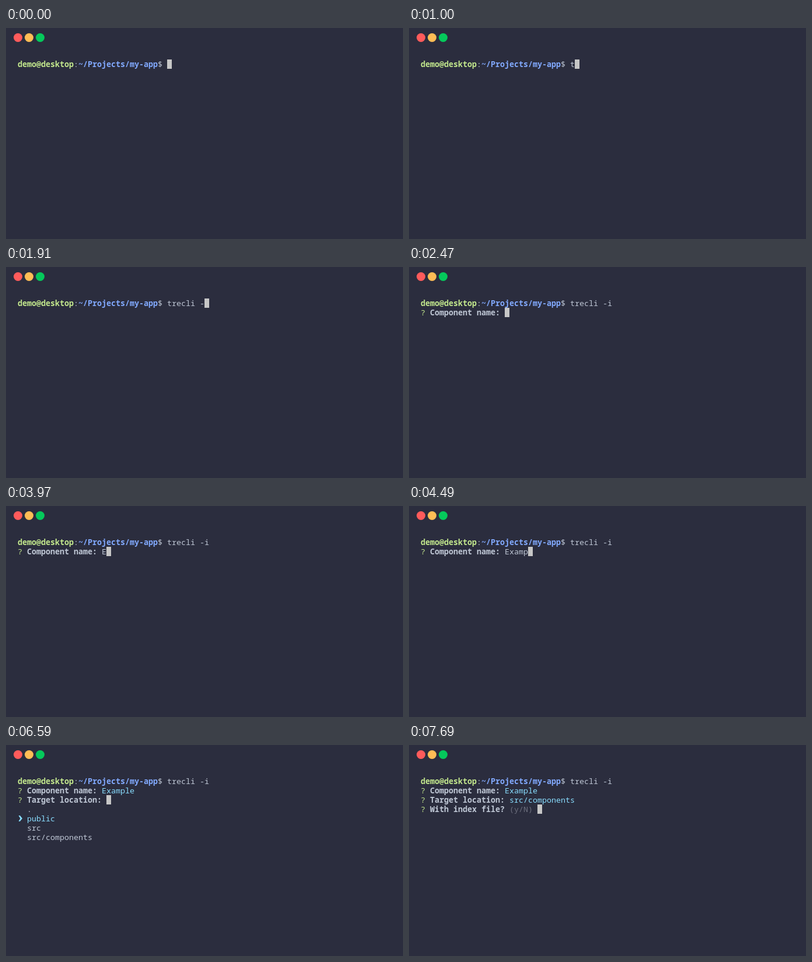
An HTML page with a canvas for the animation above (8000 ms loop, 680x362 px).

```html
<!DOCTYPE html>
<html lang="en">
<head>
<meta charset="utf-8">
<title>Terminal session</title>
<style>
  html, body { margin: 0; width: 100%; height: 100%; overflow: hidden; background: #2b2d3e; }
  canvas { display: block; }
</style>
</head>
<body>
<canvas id="stage" width="680" height="362"></canvas>
<script>
const ctx = document.getElementById('stage').getContext('2d');

const LOOP = 8000, KEY_DELAY = 130;
const CELL = 8, ROW = 16, LEFT = 20, TOP = 54, BASELINE = 13;
const FONT = `${CELL / 0.6}px "Noto Sans Mono", "DejaVu Sans Mono", monospace`;
const COLOR = {
  back: '#2b2d3e', text: '#bfc7d5', green: '#c3e88d', blue: '#82aaff',
  cyan: '#89ddff', dim: '#6c6f7d', cursor: '#c7c7c7'
};
const BUTTONS = ['#ff5b5b', '#ffbd55', '#05c95b'];
const FOLDERS = ['.', 'public', 'src', 'src/components'];
const POINTER = '❯';

const run = (text, color = COLOR.text, bold = false) => ({ text, color, bold });
const question = label => [run('? ', COLOR.green), run(label + ' ', COLOR.text, true)];
const typed = (text, start, t) =>
  text.slice(0, Math.max(0, Math.floor((t - start) / KEY_DELAY) + 1));

const shell = [
  run('demo@desktop', COLOR.green, true), run(':'),
  run('~/Projects/my-app', COLOR.blue, true), run('$ ')
];

// Returns the lines on screen and the line that holds the cursor.
function screenAt(t) {
  const lines = [[...shell, run(typed('trecli -i', 1000, t))]];
  if (t < 2170) return { lines, cursorRow: 0 };
  if (t < 2470) return { lines: [...lines, []], cursorRow: 1 };

  const answered = t >= 4990;
  lines.push([
    ...question('Component name:'),
    run(typed('Example', 3970, t), answered ? COLOR.cyan : COLOR.text)
  ]);
  if (!answered) return { lines, cursorRow: 1 };
  if (t < 5090) return { lines: [...lines, []], cursorRow: 2 };

  const location = question('Target location:');
  lines.push(location);
  if (t >= 7690) {
    location.push(run('src/components', COLOR.cyan));
    lines.push([...question('With index file?'), run('(y/N) ', COLOR.dim)]);
    return { lines, cursorRow: 3 };
  }

  const selected = [6590, 6790, 6990].filter(time => t >= time).length;
  if (selected === 0) location.push(run('(Use arrow keys or type to search)', COLOR.dim));
  FOLDERS.forEach((name, i) => lines.push(i === selected
    ? [run(POINTER, COLOR.cyan), run(' ' + name, COLOR.cyan)]
    : [run('  ' + name)]));
  return { lines, cursorRow: 2 };
}

function drawPointer(x, y) {
  ctx.beginPath();
  ctx.moveTo(x + 1.5, y + 3);
  ctx.lineTo(x + 4, y + 3);
  ctx.lineTo(x + 8, y + 8);
  ctx.lineTo(x + 4, y + 13);
  ctx.lineTo(x + 1.5, y + 13);
  ctx.lineTo(x + 4.5, y + 8);
  ctx.fill();
}

function drawLine(runs, row) {
  const y = TOP + row * ROW;
  let x = LEFT;
  for (const { text, color, bold } of runs) {
    ctx.fillStyle = color;
    ctx.font = (bold ? 'bold ' : '') + FONT;
    if (text === POINTER) drawPointer(x, y);
    else ctx.fillText(text, x, y + BASELINE);
    x += text.length * CELL;
  }
  return x;
}

function draw(t) {
  ctx.fillStyle = COLOR.back;
  ctx.fillRect(0, 0, 680, 362);
  BUTTONS.forEach((color, i) => {
    ctx.fillStyle = color;
    ctx.beginPath();
    ctx.arc(20.5 + i * 19, 16.5, 7.5, 0, Math.PI * 2);
    ctx.fill();
  });

  const { lines, cursorRow } = screenAt(t);
  const ends = lines.map(drawLine);
  ctx.fillStyle = COLOR.cursor;
  ctx.fillRect(ends[cursorRow], TOP + cursorRow * ROW, CELL, ROW);
}

const start = performance.now();
function tick() {
  draw((performance.now() - start) % LOOP);
  requestAnimationFrame(tick);
}
tick();
</script>
</body>
</html>
```
